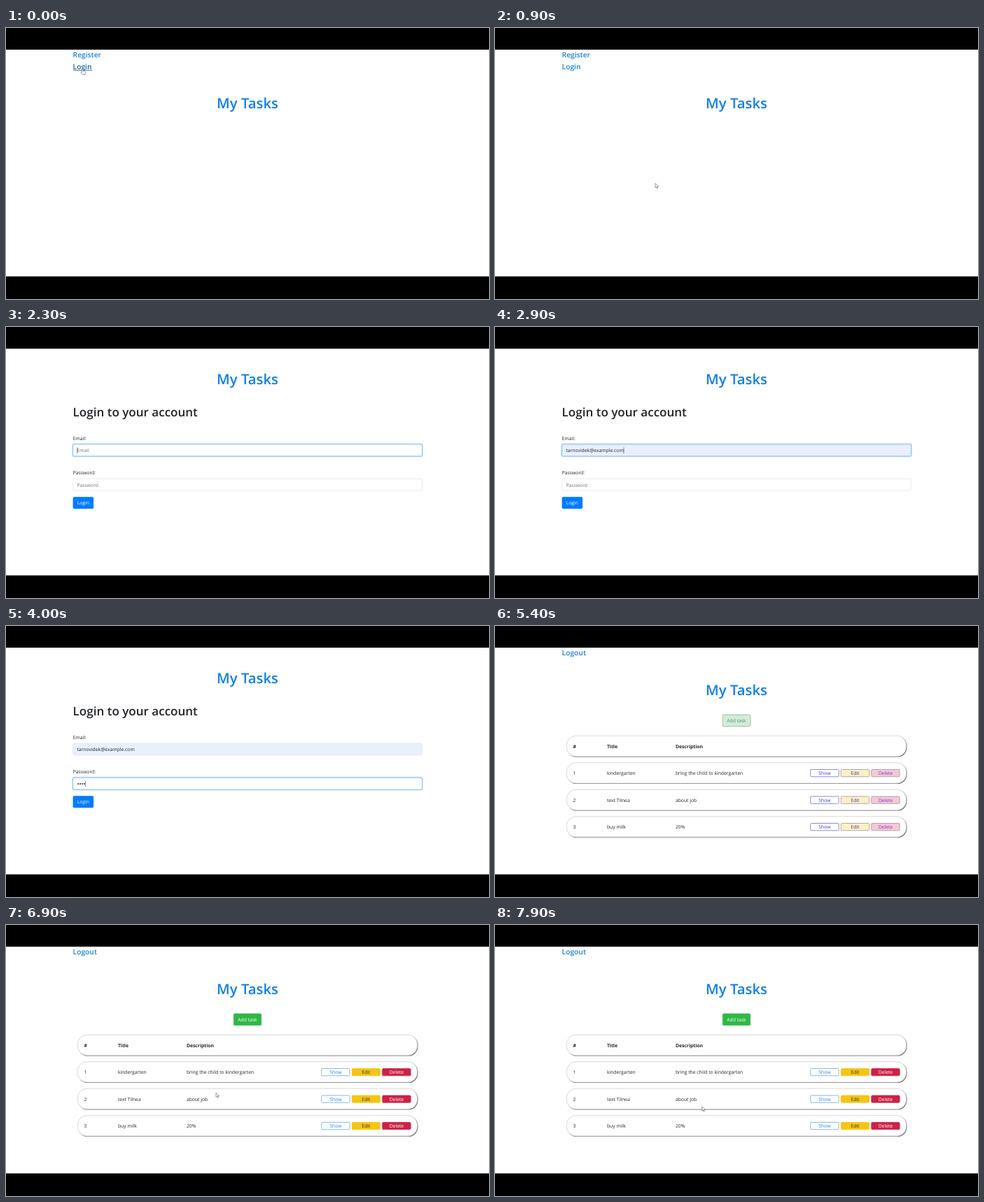
These frames come from a looping animation (690 px wide and 388 px high, 8 s). An HTML page:

```html
<!DOCTYPE html>
<html lang="en">
<head>
<meta charset="utf-8">
<title>My Tasks</title>
<style>
html, body { margin: 0; width: 100%; height: 100%; overflow: hidden; background: #000; }
svg { display: block; width: 100vw; height: 100vh; }
text { font: 400 6.8px "Open Sans", "Noto Sans", sans-serif; fill: #212529; text-rendering: geometricPrecision; }
.title { font-size: 20.3px; font-weight: 600; fill: #107fe6; text-anchor: middle; }
.head { font-size: 17.05px; font-weight: 600; }
.nav { font-size: 10.25px; font-weight: 600; fill: #1c80dd; }
.th { font-weight: 700; }
.hint { fill: #6c757d; }
.mid { text-anchor: middle; }
.input { fill: #fff; stroke: #ced4da; stroke-width: .5; }
.ring { fill: none; stroke: #007bff; stroke-opacity: .25; stroke-width: 1.5; }
.edge { fill: none; stroke: #80bdff; stroke-width: .6; }
.shade { fill: #707070; filter: blur(.3px); }
.row { fill: #fff; stroke: #b0b0b0; stroke-width: .5; }
.caret { stroke: #222; stroke-width: .55; }
.pointer path { fill: #fff; stroke: #555; stroke-width: .6; stroke-linejoin: round; }
</style>
</head>
<body>
<svg viewBox="0 0 690 388" preserveAspectRatio="none">
  <rect width="690" height="388"/>
  <rect y="31" width="690" height="324.6" fill="#fff"/>
  <text id="title" class="title" x="345"></text>

  <g id="home">
    <text class="nav" x="95.6" y="41.8">Register</text>
    <text id="loginLink" class="nav" x="95.6" y="58.5">Login</text>
    <rect id="underline" x="95.8" y="60" width="27.4" height=".8" fill="#1d5f9f"/>
  </g>

  <g id="login">
    <text class="head" x="95.6" y="128.2">Login to your account</text>
    <text x="95.7" y="161.7">Email:</text>
    <rect id="emailBox" class="input" x="95.7" y="168" width="498.7" height="16.8" rx="1.8"/>
    <g id="emailRing"></g>
    <text id="email" x="101.4" y="179.2"></text>
    <text x="95.7" y="211">Password:</text>
    <rect class="input" x="95.7" y="217.3" width="498.7" height="16.8" rx="1.8"/>
    <g id="passRing"></g>
    <text id="passHint" class="hint" x="101.4" y="228.6">Password</text>
    <g id="dots" fill="#333"></g>
    <line id="caret" class="caret"/>
    <rect id="submit" x="95.6" y="243.3" width="29.5" height="16.9" rx="1.8"/>
    <text id="submitText" class="mid" x="110.3" y="254.4">Login</text>
  </g>

  <g id="tasks">
    <text class="nav" x="95.6" y="41.8">Logout</text>
    <g id="table"></g>
  </g>

  <g id="hand" class="pointer"><path d="M2.3 0c.9 0 .9.6.9 3l2.4.5c.8.2 1 .6.9 1.4L6 8H2.5L.3 5.2c-.5-.8.4-1.2 1.2-.3V.8Q1.5 0 2.3 0z"/></g>
  <g id="arrow" class="pointer"><path d="M0 0V6.3L1.5 5 2.5 7.3 3.5 6.9 2.5 4.7H4.6Z"/></g>
</svg>
<script>
const LOOP = 8000, STEP = 100;
const EMAIL = 'tarnovidek@example.com';
const $ = id => document.getElementById(id);
const show = (id, on) => { $(id).style.display = on ? '' : 'none'; };
const clamp = v => Math.max(0, Math.min(1, v));
const ramp = (t, from, span) => clamp((t - from) / span);

function mix(a, b, p) {
  const part = (s, i) => parseInt(s.slice(i, i + 2), 16);
  return 'rgb(' + [1, 3, 5].map(i => Math.round(part(a, i) + (part(b, i) - part(a, i)) * p)).join(',') + ')';
}

// Fill, border and text colours before and after the style transition.
const STYLES = {
  add:  { from: ['#cfeed7', '#7ca58c', '#67788c'], to: ['#2fb845', '#2fb845', '#ffffff'] },
  show: { from: ['#ffffff', '#5955d8', '#4038d4'], to: ['#ffffff', '#4b9df5', '#2684ed'] },
  edit: { from: ['#fdf0c7', '#8e8a86', '#3d32a8'], to: ['#f6c413', '#f6c413', '#30332f'] },
  del:  { from: ['#f4c9d5', '#a08098', '#7b3cc0'], to: ['#cd2145', '#cd2145', '#ffffff'] }
};

const button = (kind, label, x, y, w, h, base) =>
  `<g data-kind="${kind}"><rect x="${x}" y="${y}" width="${w}" height="${h}" rx="1.5" stroke-width=".7"/>` +
  `<text class="mid" x="${x + w / 2}" y="${base}">${label}</text></g>`;

const row = (i, cells, cls) => {
  const y = 157.2 + 38.5 * i, base = y + 17.4;
  const plate = (name, d) =>
    `<rect class="${name}" x="${102.3 + d}" y="${y + d}" width="485.3" height="29.5" rx="13.5"/>`;
  return plate('shade', .9) + plate('row', 0) +
    [111.6, 159.9, 257.9].map((x, k) => `<text class="${cls}" x="${x}" y="${base}">${cells[k]}</text>`).join('');
};

function buildTable() {
  const items = [['kindergarten', 'bring the child to kindergarten'], ['text Tilnea', 'about job'], ['buy milk', '20%']];
  let html = button('add', 'Add task', 325.3, 127, 39.4, 16.6, 137.9) + row(0, ['#', 'Title', 'Description'], 'th');
  items.forEach((item, n) => {
    const y = 205.5 + 38.5 * n;
    html += row(n + 1, [n + 1, ...item], '');
    [['show', 'Show'], ['edit', 'Edit'], ['del', 'Delete']].forEach(([kind, label], k) => {
      html += button(kind, label, 450.7 + 43.5 * k, y, 40.4, 10.3, y + 7.6);
    });
  });
  $('table').innerHTML = html;
}

function buildFields() {
  for (const [id, y] of [['emailRing', 168], ['passRing', 217.3]]) {
    $(id).innerHTML = `<rect class="ring" x="95" y="${y - .7}" width="500.1" height="18.2" rx="2.4"/>` +
      `<rect class="edge" x="95.7" y="${y}" width="498.7" height="16.8" rx="1.8"/>`;
  }
  for (let i = 0; i < 6; i++) $('dots').innerHTML += `<circle cx="${103.2 + 2.9 * i}" cy="226.1" r="1"/>`;
}

// Each path holds [time, x, y]; points are joined by a smooth curve.
const PATHS = [
  { end: 1600, pts: [[100, 107, 58.5], [300, 165, 82], [500, 330, 142], [600, 365, 180], [700, 325, 210], [900, 229, 222.3]] },
  { end: 2100, pts: [[1800, 187.9, 188.7], [1900, 185, 183], [2000, 182, 176]] },
  { end: LOOP, pts: [[6100, 174, 214.5], [6500, 215, 226], [6900, 300, 240], [7200, 338, 200], [7400, 300, 151],
                     [7600, 226, 192], [7800, 265, 266], [7900, 295.7, 259.8]] }
];

function along(pts, t) {
  let i = 0;
  while (i < pts.length - 2 && t >= pts[i + 1][0]) i++;
  const at = k => pts[Math.max(0, Math.min(pts.length - 1, k))];
  const [a, b, c, d] = [at(i - 1), at(i), at(i + 1), at(i + 2)];
  const u = ramp(t, b[0], c[0] - b[0]);
  return [1, 2].map(k => b[k] + u / 2 * (c[k] - a[k] + u * (2 * a[k] - 5 * b[k] + 4 * c[k] - d[k]
    + u * (3 * (b[k] - c[k]) + d[k] - a[k]))));
}

function drawPointer(t) {
  const path = PATHS.find(p => t < p.end && (t >= p.pts[0][0] || p === PATHS[0]));
  const hand = t < 200;
  show('hand', hand);
  show('arrow', path && !hand);
  if (path) {
    const [x, y] = along(path.pts, t);
    $(hand ? 'hand' : 'arrow').setAttribute('transform', `translate(${x} ${y})`);
  }
}

function drawLogin(t) {
  const filled = t >= 2600, onPass = t >= 3200;
  const typed = [3600, 3700, 3800, 4000, 4300, 4600].filter(k => t >= k).length;
  $('email').textContent = filled ? EMAIL : 'Email';
  $('email').setAttribute('class', filled ? '' : 'hint');
  $('emailBox').style.fill = filled ? '#e8f0fe' : '#fff';
  $('emailRing').style.opacity = ramp(t, 2000, 200) * (1 - ramp(t, 3100, 200));
  $('passRing').style.opacity = ramp(t, 3100, 200);
  show('passHint', !typed);
  [...$('dots').children].forEach((dot, i) => { dot.style.display = i < typed ? '' : 'none'; });

  const x = onPass ? 101.7 + 2.9 * typed : filled ? 101.6 + $('email').getComputedTextLength() : 101.7;
  const y = onPass ? 221.6 : 172.3;
  Object.entries({ x1: x, x2: x, y1: y, y2: y + 8.6 }).forEach(([k, v]) => $('caret').setAttribute(k, v));
  show('caret', t >= 2100 && t < 5100);

  const p = t < 1400 ? .4 : 1;
  $('submit').style.fill = mix('#efefef', '#007bff', p);
  $('submitText').style.fill = mix('#222222', '#ffffff', p);
}

function drawTasks(t) {
  const p = 1 - (1 - ramp(t, 5400, 300)) ** 2;
  for (const g of $('table').querySelectorAll('[data-kind]')) {
    const { from, to } = STYLES[g.dataset.kind];
    const [fill, edge, ink] = from.map((c, i) => mix(c, to[i], p));
    g.firstChild.style.fill = fill;
    g.firstChild.style.stroke = edge;
    g.lastChild.style.fill = ink;
  }
}

function draw(t) {
  const page = t < 1300 ? 'home' : t < 5400 ? 'login' : 'tasks';
  for (const id of ['home', 'login', 'tasks']) show(id, id === page);
  $('title').setAttribute('y', { home: 115.4, login: 82.4, tasks: 98.9 }[page]);
  $('title').textContent = 'My Tasks';
  $('loginLink').style.fill = t < 300 ? '#1d5f9f' : '';
  show('underline', t < 300);
  if (page === 'login') drawLogin(t);
  if (page === 'tasks') drawTasks(t);
  drawPointer(t);
}

buildTable();
buildFields();
const start = performance.now();
function tick(now) {
  const t = Math.max(0, now - start) % LOOP;
  draw(Math.floor(t / STEP) * STEP);
  requestAnimationFrame(tick);
}
draw(0);
requestAnimationFrame(tick);
</script>
</body>
</html>
```
